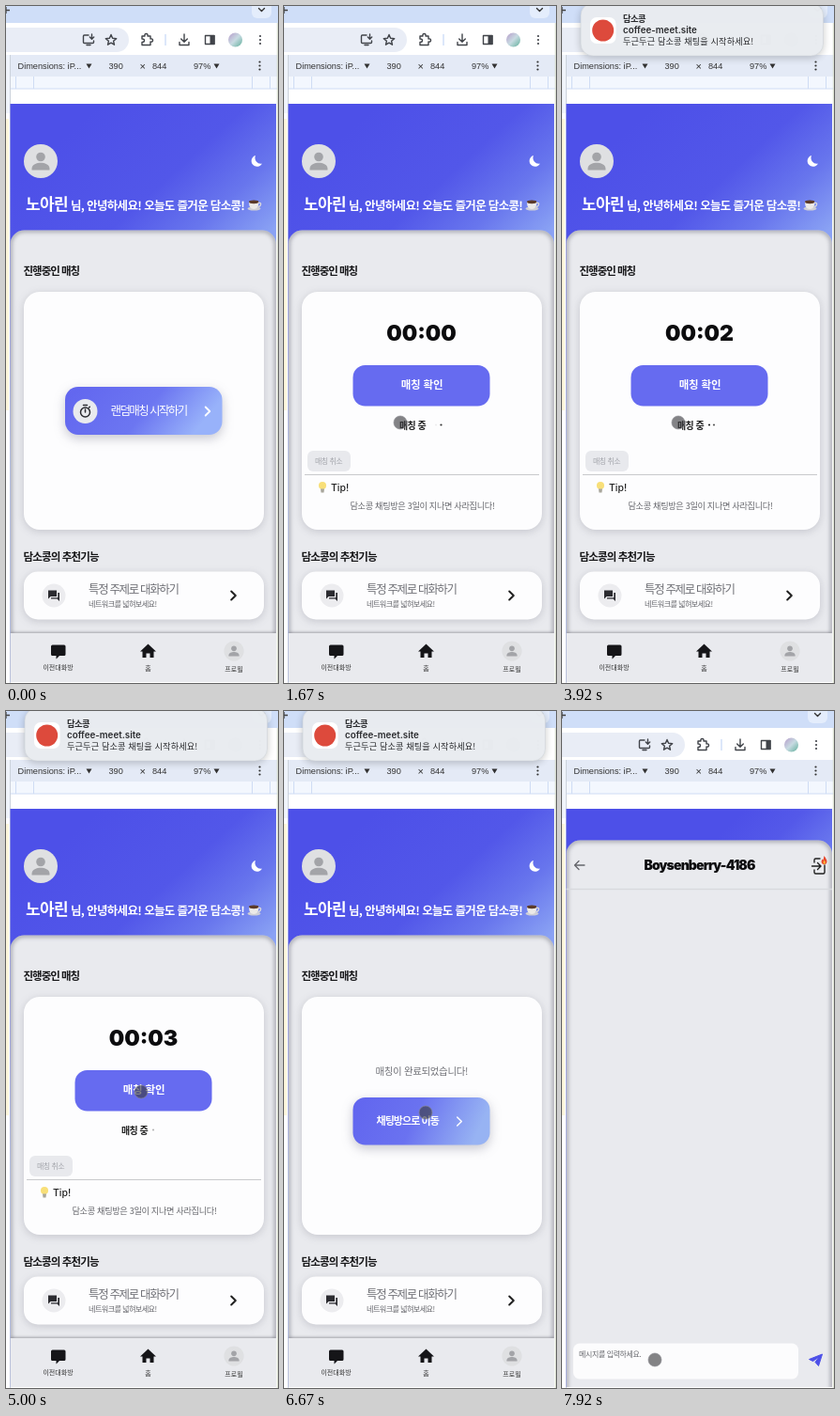
These frames come from a looping animation (290x720 px, 8000 ms). An HTML page:

```html
<!DOCTYPE html>
<html lang="ko">
<head>
<meta charset="utf-8">
<title>Matching demo</title>
<style>
  html, body { margin: 0; width: 100%; height: 100%; overflow: hidden; background: #fff; }
  svg { display: block; width: 290px; height: 720px; }
  text { font-family: Inter, "Noto Sans CJK KR", "Noto Sans CJK", sans-serif; white-space: pre; }
  .ko { font-family: "Noto Sans CJK KR", "Noto Sans CJK", "Noto Sans CJK JP", sans-serif; }
  .ui { fill: #333; }
  .ui text { font-family: "Liberation Sans", Arial, sans-serif; font-size: 9.2px; }
  .m { font-weight: 500; }
  .b { font-weight: 700; }
  .x { font-weight: 900; }
  .mid { text-anchor: middle; }
  .line { fill: none; stroke-linecap: round; stroke-linejoin: round; }
  .card { fill: #fdfdfe; filter: drop-shadow(0 2px 4px rgba(60, 60, 80, .2)); }
  .lift { filter: drop-shadow(0 4px 6px rgba(60, 60, 90, .28)); }
  .inset { fill: none; stroke: #5c5f6c; stroke-opacity: .5; stroke-width: 4; filter: blur(2px); }
</style>
</head>
<body>
<svg viewBox="0 0 290 720">
  <defs>
    <linearGradient id="sky" gradientUnits="userSpaceOnUse" x1="105" y1="100" x2="255" y2="265">
      <stop offset="0" stop-color="#4d50e8"/><stop offset=".48" stop-color="#5257e9"/>
      <stop offset=".75" stop-color="#6876ed"/><stop offset="1" stop-color="#8aa2f4"/>
    </linearGradient>
    <linearGradient id="strip" gradientUnits="userSpaceOnUse" x1="200" y1="100" x2="265" y2="165">
      <stop offset="0" stop-color="#4d50e8"/><stop offset=".5" stop-color="#5459e9"/><stop offset="1" stop-color="#6a78ee"/>
    </linearGradient>
    <linearGradient id="start" x2="1" y2=".25">
      <stop offset="0" stop-color="#6165ef"/><stop offset=".6" stop-color="#6c76f1"/><stop offset="1" stop-color="#98b2fa"/>
    </linearGradient>
    <linearGradient id="go" x2="1" y2=".15">
      <stop offset="0" stop-color="#6165ef"/><stop offset=".5" stop-color="#6a72f0"/><stop offset="1" stop-color="#97b3f3"/>
    </linearGradient>
    <linearGradient id="photo" x2="1" y2="1">
      <stop offset="0" stop-color="#b79ccb"/><stop offset=".5" stop-color="#c8dbe2"/><stop offset="1" stop-color="#5fae9a"/>
    </linearGradient>
    <g id="person">
      <circle r="18" fill="#dfe0e2"/>
      <circle cy="-4.5" r="4.8" fill="#a3a4a8"/>
      <path d="M-9.5 9.5V8C-9.5 3.500-4 1.800 0 1.800S9.500 3.500 9.500 8V9.500Z" fill="#a3a4a8"/>
    </g>
    <g id="kebab"><circle cy="-4" r="1.1"/><circle r="1.1"/><circle cy="4" r="1.1"/></g>
    <path id="chev" class="line" d="M-2.300-4.500L2.300 0L-2.300 4.500"/>
    <clipPath id="screen"><rect x="4.500" y="104" width="283.500" height="615"/></clipPath>
    <rect id="sheet" x="4.500" width="283.500" height="620" rx="15"/>
    <clipPath id="sheetClip"><use href="#sheet"/></clipPath>
    <g id="panel">
      <use href="#sheet" fill="#e9eaee"/>
      <g clip-path="url(#sheetClip)"><use href="#sheet" class="inset"/></g>
    </g>
  </defs>

  <!-- browser -->
  <rect width="290" height="720" fill="#fff"/>
  <rect width="290" height="18" fill="#cfdef8"/>
  <path d="M0 4.500H4M0 1V8" stroke="#444" stroke-width="1.300"/>
  <rect x="262" y="-8" width="21" height="21" rx="6" fill="#e4edfc"/>
  <path class="line" d="M269.500 2.500L272.500 5.500L275.500 2.500" stroke="#333" stroke-width="1.400"/>
  <rect x="-20" y="23" width="151" height="26" rx="13" fill="#e9edf6"/>
  <g class="line" stroke="#41444a" stroke-width="1.400">
    <path d="M88 31H83.500Q82.500 31 82.500 32V38.500Q82.500 39.500 83.500 39.500H92.500Q93.500 39.500 93.500 38.500V37M86 41.500H90M91.500 30V35M89.300 33L91.500 35.200L93.700 33"/>
    <path d="M112 30.500L113.600 34.300L117.700 34.600L114.600 37.300L115.500 41.200L112 39.100L108.500 41.200L109.400 37.300L106.300 34.600L110.400 34.300Z"/>
    <path d="M145 32H148Q147.500 29.500 149.500 29.500T151 32H154V35Q156.500 34.500 156.500 36.500T154 38V41.500H145V38.500Q147.500 38.500 147.500 36.700T145 35Z"/>
    <path d="M190 30V38M186.700 35L190 38.300L193.300 35M185 38.500V41.500H195V38.500"/>
    <rect x="212.500" y="31.500" width="9.500" height="9"/>
  </g>
  <rect x="217.500" y="31" width="5" height="10" fill="#41444a"/>
  <path d="M170 30V42" stroke="#c9daf7" stroke-width="1.300"/>
  <circle cx="244.500" cy="36" r="7.500" fill="url(#photo)"/>
  <use href="#kebab" x="271" y="36" fill="#41444a"/>
  <rect x="4" y="52" width="286" height="23" fill="#e4eaf6"/>
  <g class="ui">
    <text x="12.500" y="67">Dimensions: iP...</text>
    <text x="109.500" y="67">390</text>
    <text x="142.500" y="67.500" style="font-size:11px">×</text>
    <text x="156" y="67">844</text>
    <text x="200" y="67">97%</text>
    <path d="M85.500 61.500H91.500L88.500 66.500ZM221.500 61.500H227.500L224.500 66.500Z"/>
    <use href="#kebab" x="270.500" y="63.500"/>
  </g>
  <rect x="4" y="75" width="286" height="13" fill="#f3f7fe"/>
  <path d="M10.500 75V88M29.500 75V88M262.500 75V88M281.500 75V88M4 88H290" stroke="#cfdcf4"/>
  <rect y="52" width="4" height="62" fill="#f0f4fb"/>
  <rect y="120" width="3" height="310" fill="#fdf6dc"/>
  <path d="M4.500 52V720" stroke="#ccd2dc"/>
  <path d="M289.300 18V720" stroke="#d6dccb"/>

  <!-- home page -->
  <g id="home" clip-path="url(#screen)">
    <rect x="4" y="104" width="284" height="616" fill="url(#sky)"/>
    <use href="#person" x="37" y="165"/>
    <path d="M266 159A6 6 0 1 0 273 167.500A6.200 6.200 0 0 1 266 159Z" fill="#fff"/>
    <text class="ko x" x="21" y="216.500" font-size="17" letter-spacing="-.6" fill="#fff">노아린</text>
    <text class="ko x" x="69" y="216.500" font-size="12.500" letter-spacing="-.66" fill="#fff">님, 안녕하세요! 오늘도 즐거운 담소콩!</text>
    <ellipse cx="264.500" cy="215.500" rx="7" ry="2" fill="#cfcfd6"/>
    <path d="M259 208H269.500Q269.500 216 264.200 216T259 208Z" fill="#eceae8"/>
    <ellipse cx="264.200" cy="208.300" rx="5.200" ry="1.900" fill="#5b3a2a"/>
    <path class="line" d="M269.300 209.500Q272.500 209 271.500 211.500T268.300 213" stroke="#dedcda" stroke-width="1.200"/>
    <use href="#panel" y="238.500"/>
    <text class="ko x" x="18.500" y="286" font-size="11.500" letter-spacing="-1" fill="#161618">진행중인 매칭</text>
    <rect class="card" x="19" y="304" width="256" height="253" rx="17"/>

    <g id="idle">
      <rect class="lift" x="63" y="405" width="167.500" height="51" rx="14" fill="url(#start)"/>
      <circle cx="84.500" cy="431" r="13" fill="#e9eaee"/>
      <g class="line" stroke="#2b2b30" stroke-width="1.500">
        <circle cx="84.500" cy="432" r="5"/><path d="M82.500 424.500H86.500M84.500 429V432M88.500 427L89.300 426.200"/>
      </g>
      <text class="ko m" x="111.500" y="434.500" font-size="12.500" letter-spacing="-1.6" fill="#fff">랜덤매칭 시작하기</text>
      <use href="#chev" x="215" y="431" stroke="#fff" stroke-width="1.800"/>
    </g>

    <g id="wait">
      <text id="clock" class="mid x" x="146.500" y="356" font-size="23.200" fill="#0c0c0e">00:00</text>
      <rect x="73.500" y="382" width="146" height="43.500" rx="13" fill="#666bf0"/>
      <text class="ko b mid" x="147" y="406.500" font-size="11.500" letter-spacing="-.2" fill="#fff">매칭 확인</text>
      <text class="ko b" x="123" y="449.500" font-size="10" letter-spacing="-.6" fill="#222">매칭 중</text>
      <g id="dots" fill="#222"><circle cx="157" cy="445.500" r="1.100"/><circle cx="162" cy="445.500" r="1.100"/><circle cx="167.500" cy="445.500" r="1.100"/></g>
      <rect x="25" y="473" width="46" height="22" rx="6" fill="#e8e9ed"/>
      <text class="ko m" x="33" y="487" font-size="8" letter-spacing="-.5" fill="#a4a6ac">매칭 취소</text>
      <path d="M22 498.500H272" stroke="#c8c9cc"/>
      <circle cx="41" cy="510" r="4" fill="#f8df78"/>
      <path d="M39 513.500H43L42.500 517.500H39.500Z" fill="#a9a79c"/>
      <text class="m" x="50" y="516" font-size="10.500" fill="#222">Tip!</text>
      <text class="ko m" x="70.500" y="535" font-size="9.200" letter-spacing="-.35" fill="#66676c">담소콩 채팅방은 3일이 지나면 사라집니다!</text>
    </g>

    <g id="done">
      <text class="ko m" x="97.500" y="386.500" font-size="10.500" letter-spacing="-.37" fill="#707177">매칭이 완료되었습니다!</text>
      <rect class="lift" x="73.500" y="411" width="146" height="50.500" rx="13" fill="url(#go)"/>
      <text class="ko x" x="98.500" y="440" font-size="11" letter-spacing="-.95" fill="#fff">채팅방으로 이동</text>
      <use href="#chev" x="187" y="436.500" stroke="#fff" stroke-width="1.500"/>
    </g>

    <text class="ko x" x="18.500" y="590" font-size="11.500" letter-spacing="-.85" fill="#161618">담소콩의 추천기능</text>
    <rect class="card" x="19" y="601.500" width="256" height="51" rx="15"/>
    <circle cx="51" cy="627" r="12.500" fill="#ececef"/>
    <path d="M45 621.500H54V628H47.500L45 630.500ZM55.300 624H57V633L54.500 630.500H48V629.300H55.300Z" fill="#2b2b30"/>
    <text class="ko m" x="88" y="625" font-size="12.500" letter-spacing="-1.35" fill="#707177">특정 주제로 대화하기</text>
    <text class="ko m" x="88" y="639" font-size="8.200" letter-spacing="-.65" fill="#66676c">네트워크를 넓혀보세요!</text>
    <use href="#chev" x="242.500" y="627" stroke="#222" stroke-width="2"/>

    <rect x="4.500" y="667" width="283.500" height="53" fill="#e9eaee" style="filter:drop-shadow(0 -1px 1.500px rgba(50,50,60,.4))"/>
    <path d="M49.500 679.500H62Q63.500 679.500 63.500 681V689.500Q63.500 691 62 691H57L53.500 694.500V691H49.500Q48 691 48 689.500V681Q48 679.500 49.500 679.500Z" fill="#151518"/>
    <path d="M151.500 678.500L160 686.500H157.500V693H153.500V688.500H149.500V693H145.500V686.500H143Z" fill="#151518"/>
    <use href="#person" transform="translate(243 686) scale(.59)"/>
    <g class="m" font-size="7" fill="#333">
      <text class="ko mid" x="55.500" y="705.500">이전대화방</text>
      <text class="ko mid" x="151.500" y="707">홈</text>
      <text class="ko mid" x="243" y="707.500">프로필</text>
    </g>
  </g>

  <!-- chat page -->
  <g id="chat" clip-path="url(#screen)">
    <rect x="4" y="104" width="284" height="616" fill="url(#strip)"/>
    <use href="#panel" y="137.500"/>
    <path d="M4 189.500H288" stroke="#d8d9dd" stroke-width="1.500"/>
    <path class="line" d="M24 164H13.500M18 159.500L13.500 164L18 168.500" stroke="#66676c" stroke-width="1.300"/>
    <text class="mid x" x="146.500" y="168.500" font-size="14" letter-spacing="-.85" fill="#0c0c0e">Boysenberry-4186</text>
    <path class="line" d="M269 161V158.500Q269 157 270.500 157H275M280 164V171.500Q280 173 278.500 173H270.500Q269 173 269 171.500V169M266.500 165H275.500M272.500 161.500L276 165L272.500 168.500" stroke="#222" stroke-width="1.400"/>
    <path d="M279.500 154Q283.500 159 282 162Q279.500 164.500 277 162Q276 159.500 277.500 157.500L278.500 158.500Z" fill="#e8482c"/>
    <path d="M279.700 158.500Q282 161.500 279.700 163Q277.500 161.500 279.700 158.500Z" fill="#f9b93a"/>
    <rect x="12" y="672.500" width="240" height="38" rx="7" fill="#fcfcfd"/>
    <text class="ko m" x="18" y="686.500" font-size="8" letter-spacing="-.4" fill="#66676c">메시지를 입력하세요.</text>
    <path d="M277.500 684L263.500 689.500L267.500 691.500L274 687L270 692.500L273.500 696.500Z" fill="#4d50e8" stroke="#4d50e8" stroke-linejoin="round"/>
  </g>

  <!-- notification -->
  <g id="note">
    <rect id="glass" x="20" y="-3" width="258.500" height="56" rx="13" fill="#e9ecf0" stroke="#cfd3d8" stroke-width=".6" style="filter:drop-shadow(0 2px 4px rgba(0,0,0,.22))"/>
    <rect x="30" y="12" width="27.500" height="28" rx="7" fill="#fff"/>
    <circle cx="43.700" cy="26" r="11.500" fill="#dd4a3c"/>
    <text class="ko b" x="65" y="17" font-size="9.300" letter-spacing="-.5" fill="#2a2b2e">담소콩</text>
    <text x="65" y="29" font-size="9.800" font-weight="600" fill="#2a2b2e">coffee-meet.site</text>
    <text class="ko m" x="65" y="41" font-size="9.200" letter-spacing=".1" fill="#2a2b2e">두근두근 담소콩 채팅을 시작하세요!</text>
  </g>

  <!-- pointers -->
  <path id="cross" d="M0-6L2.500-3H1V-1H3V-2.500L6 0L3 2.500V1H1V3H2.500L0 6L-2.500 3H-1V1H-3V2.500L-6 0L-3-2.500V-1H-1V-3H-2.500Z" fill="#111" stroke="#fff" stroke-width="1.200" paint-order="stroke"/>
  <circle id="touch" r="7" fill="#38383c" fill-opacity=".62" stroke="#8a8a90" stroke-opacity=".8" stroke-width=".8"/>
</svg>
<script>
  const LOOP = 8000, START = 1300, MATCHED = 5300, ENTER = 6750;
  const $ = id => document.getElementById(id);
  const show = (id, on) => { $(id).style.display = on ? '' : 'none'; };
  const move = (id, x, y) => $(id).setAttribute('transform', `translate(${x} ${y})`);
  const clamp = v => Math.min(1, Math.max(0, v));
  const ease = k => k * k * (3 - 2 * k);

  // rows: time, then values
  const pointer = [[0, 112, 455], [550, 112, 455], [750, 115, 449], [920, 115, 449], [1180, 124, 443],
    [4350, 124, 443], [4850, 144, 405], [5500, 144, 405], [6200, 151, 427], [6900, 151, 427], [7650, 99, 690], [LOOP, 99, 690]];
  const note = [[0, 275, .6], [2480, 275, .6], [2780, 0, .78], [3080, 0, .99], [7050, 0, .99], [7450, 275, .9], [LOOP, 275, .9]];
  const peaks = [.87, .82, .76];

  function at(rows, t) {
    const i = rows.findIndex(r => r[0] > t), a = rows[i - 1], b = rows[i];
    const k = ease((t - a[0]) / (b[0] - a[0]));
    return a.slice(1).map((v, n) => v + (b[n + 1] - v) * k);
  }

  function draw(t) {
    show('home', t < ENTER);
    show('chat', t >= ENTER);
    show('idle', t < START);
    show('wait', t >= START && t < MATCHED);
    show('done', t >= MATCHED);

    const secs = Math.max(0, Math.floor((t - START) / 1000));
    $('clock').textContent = '00:' + String(secs).padStart(2, '0');
    [...$('dots').children].forEach((dot, i) => {
      const d = t / 1000 - peaks[i];
      dot.style.opacity = clamp(2.2 - Math.abs(d - Math.round(d)) / .07);
    });

    const [x, alpha] = at(note, t);
    show('note', x < 274);
    move('note', x, 0);
    $('glass').style.opacity = alpha;

    const [px, py] = at(pointer, t);
    show('cross', t >= 550 && t < 920);
    show('touch', t >= 920);
    move('cross', px, py);
    move('touch', px, py);
  }

  function tick() {
    draw(performance.now() % LOOP);
    requestAnimationFrame(tick);
  }
  tick();
</script>
</body>
</html>
```
